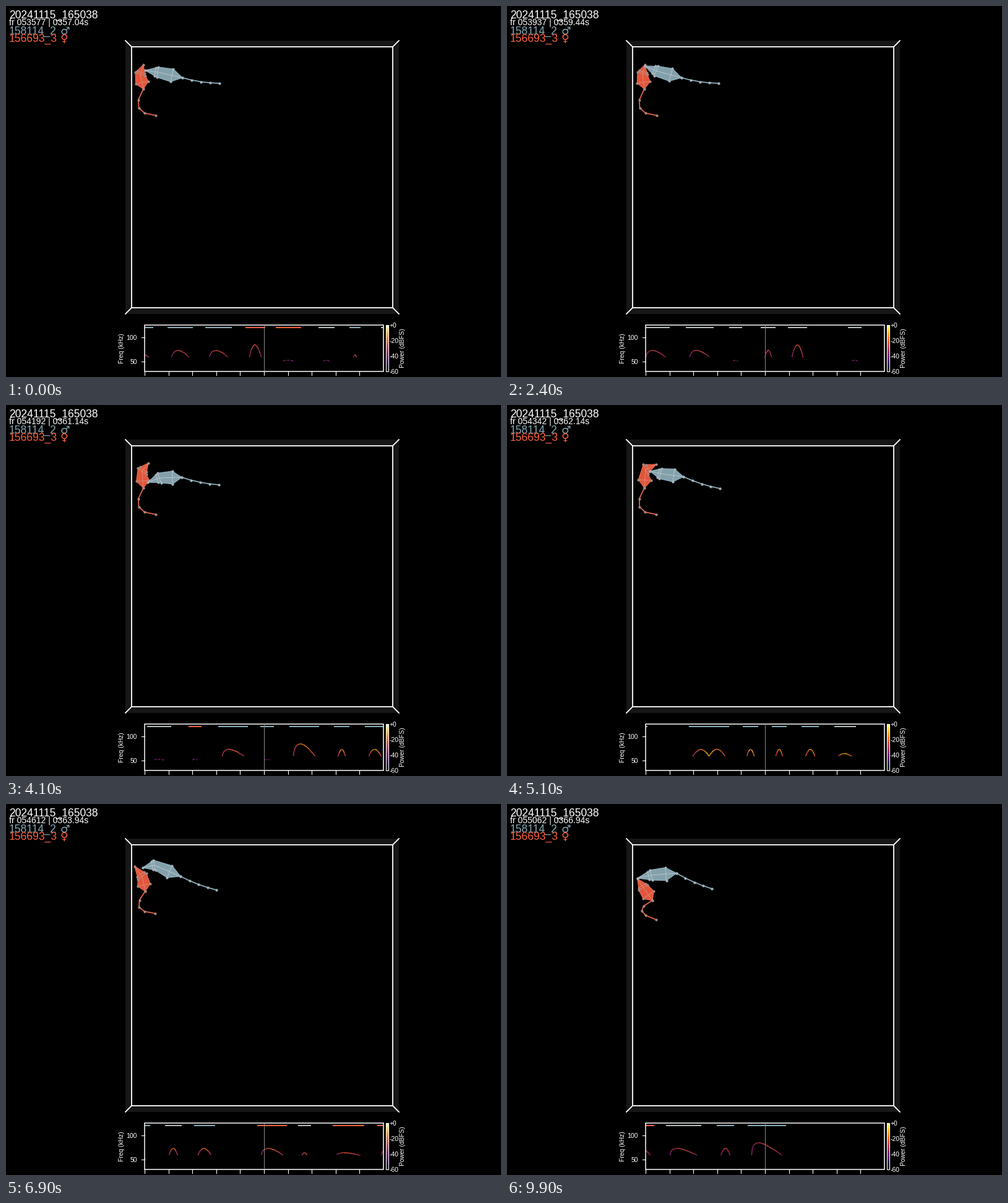
Write a matplotlib script that moves like this. It is 800 by 600 pixels and loops after 10000 ms.

```python
import numpy as np
import matplotlib.pyplot as plt
from matplotlib.animation import FuncAnimation
from matplotlib.collections import LineCollection
from matplotlib.patches import Polygon, Rectangle

FRAMES, STEP = 100, 0.1
PT = 0.72  # points per pixel at 100 dpi
X0, X1, TOP, BOTTOM = 224, 610, 516, 591
SPAN = X1 - X0  # pixels per second of sound
SANS = "Liberation Sans"
COLORS = {"b": "#84adb8", "r": "#f9603f", "g": "#b3bbb9"}
HEIGHTS = {"low": 1, "soft": 4, "hump": 11, "tall": 20}
rng = np.random.default_rng(4)

# Key poses: nose, neck, rump, tail tip
KEYS = np.array([0, 24, 41, 51, 69, 86, 99])
MALE = [
    [225, 104, 245, 107, 285, 116, 345, 125],
    [223, 97, 241, 105, 282, 116, 342, 125],
    [229, 125, 248, 118, 284, 117, 344, 129],
    [231, 107, 248, 111, 285, 116, 344, 135],
    [221, 103, 240, 99, 282, 117, 340, 139],
    [238, 106, 254, 109, 287, 116, 342, 144],
    [211, 120, 233, 115, 274, 112, 331, 137],
]
FEMALE = [
    [222, 95, 217, 110, 222, 134, 242, 177],
    [223, 95, 219, 109, 222, 134, 242, 177],
    [230, 94, 220, 107, 222, 134, 242, 177],
    [241, 96, 224, 104, 222, 134, 241, 177],
    [208, 101, 220, 117, 225, 141, 241, 177],
    [207, 143, 217, 136, 231, 142, 241, 177],
    [211, 121, 220, 135, 235, 156, 241, 187],
]

# Calls: onset and length in ms, caller, kind
CALLS = [
    (-549, 85, "b", "soft"), (-404, 106, "b", "hump"), (-246, 111, "b", "hump"),
    (-78, 83, "r", "tall"), (49, 106, "r", "low"), (228, 67, "g", "low"),
    (357, 47, "b", "soft"), (489, 90, "g", "hump"),
    (1884, 117, "g", "hump"), (2068, 117, "g", "hump"), (2250, 54, "g", "low"),
    (2382, 62, "g", "hump"), (2496, 80, "g", "tall"), (2747, 57, "g", "low"),
    (3610, 101, "g", "low"), (3784, 54, "r", "low"), (3908, 124, "b", "hump"),
    (4084, 57, "b", "low"), (4206, 124, "b", "tall"), (4393, 65, "b", "hump"),
    (4522, 85, "b", "hump"), (4781, 168, "b", "hump"), (5007, 65, "b", "hump"),
    (5128, 62, "b", "hump"), (5253, 73, "b", "hump"), (5390, 91, "g", "soft"),
    (6369, 54, "b", "low"), (6485, 70, "g", "hump"), (6607, 88, "b", "hump"),
    (6872, 124, "r", "hump"), (7042, 54, "g", "soft"), (7188, 132, "r", "soft"),
    (7374, 104, "r", "hump"), (8028, 75, "g", "hump"), (8605, 73, "b", "low"),
    (9027, 85, "r", "low"), (9338, 98, "r", "hump"), (9485, 148, "g", "hump"),
    (9698, 73, "b", "hump"), (9827, 161, "b", "tall"),
]
# Regular bouts of calling between them
for first, last in [(660, 1850), (2930, 3550), (5600, 6300), (7560, 7900)]:
    for ms in range(first, last, 180):
        CALLS.append((ms, rng.integers(65, 115), rng.choice(["b", "g"]), "hump"))


def unit(v):
    return v / np.hypot(*v)


def across(center, direction, half):
    """Two points on either side of a body axis."""
    side = half * unit(np.array([-direction[1], direction[0]]))
    return center + side, center - side


def blend(poses, n):
    """Eased pose between the two nearest keys, as (x, y) rows."""
    i = min(np.searchsorted(KEYS, n, side="right") - 1, len(KEYS) - 2)
    u = (n - KEYS[i]) / (KEYS[i + 1] - KEYS[i])
    u = u * u * (3 - 2 * u)
    a, b = np.array(poses[i], float), np.array(poses[i + 1], float)
    return (a + (b - a) * u).reshape(-1, 2)


fig = plt.figure(figsize=(8, 6), dpi=100, facecolor="black")
spec = fig.add_axes([X0 / 800, 1 - BOTTOM / 600, SPAN / 800, (BOTTOM - TOP) / 600])
spec.set_ylim(BOTTOM, TOP)
spec.axis("off")
ax = fig.add_axes([0, 0, 1, 1], zorder=2)
ax.axis("off")


def line(xs, ys, color="white", w=1.5, **kw):
    return ax.plot(xs, ys, color=color, lw=w * PT, **kw)[0]


def box(x, y, w, h, lw=0.0, fc="none"):
    ax.add_patch(Rectangle((x, y), w, h, fc=fc, ec="white" if lw else "none", lw=lw * PT))


def text(x, y, s, size, color="white", family=SANS, **kw):
    kw.setdefault("va", "baseline")
    return ax.text(x, y, s, fontsize=size * PT, color=color, family=family, **kw)


class Mouse:
    """A kite-shaped body on a nose-neck-rump spine, with a curved tail."""

    def __init__(self, poses, fill, edge, inner, node, z, bend=None):
        self.poses, self.bend = poses, bend
        self.shape = Polygon(np.zeros((8, 2)), fc=fill, ec=edge, lw=1.2 * PT, zorder=z)
        ax.add_patch(self.shape)
        self.bones = LineCollection([], colors=inner, linewidths=PT, zorder=z + 0.1)
        ax.add_collection(self.bones)
        self.rope = line([], [], edge, 1.7, zorder=z + 0.2)
        self.dots = line([], [], node, 1, ls="", marker="o", ms=4.2 * PT,
                         mew=0, zorder=z + 0.3)

    def pose(self, n):
        nose, neck, rump, tip = blend(self.poses, n)
        head, mid = neck + 0.2 * (nose - neck), neck + 0.58 * (rump - neck)
        ear1, ear2 = across(head, nose - neck, 6.5)
        sh1, sh2 = across(neck, nose - neck, 8.3)
        fl1, fl2 = across(mid, neck - rump, 10.4)
        body = np.array([nose, ear1, sh1, fl1, rump, fl2, sh2, ear2])
        bend = (rump + tip) / 2 + [0, 4] if self.bend is None else self.bend
        t = np.linspace(0, 1, 5)[:, None]
        tail = (1 - t) ** 2 * rump + 2 * t * (1 - t) * np.array(bend) + t * t * tip
        self.shape.set_xy(body)
        self.bones.set_segments([[nose, head, neck, mid, rump], [ear1, head, ear2],
                                 [sh1, neck, sh2], [fl1, mid, fl2]])
        self.rope.set_data(*tail.T)
        self.dots.set_data(*np.vstack([body, tail]).T)


def trace(ms, length, kind):
    """Pitch contour of a call and its loudness, one point per pixel."""
    low = kind == "low"
    inset = 0.3 * length if low else 17
    a, b = (ms + inset) * SPAN / 1000, (ms + length - inset) * SPAN / 1000
    x = np.arange(a, b + 0.5)
    u = np.linspace(0, 1, len(x))
    humps = 2 if kind == "hump" and length > 150 else 1
    skew = 1 if humps > 1 else min(1, 75 / length)
    lift = np.abs(np.sin(np.pi * humps * u ** skew)) ** 0.9
    y = (574 if low else 568) - HEIGHTS[kind] * lift + rng.normal(0, 0.25, len(x))
    peak = 0.58 + 0.24 * np.exp(-((ms / 1000 - 5.2) / 1.5) ** 2)
    power = 0.36 if low else peak * (0.65 + 0.35 * np.sin(np.pi * u))
    return np.column_stack([x, y]), power * rng.uniform(0.85, 1.12, len(x))


segs, heat = [], []
for ms, length, who, kind in CALLS:
    path, power = trace(ms, length, kind)
    for i in range(len(path) - 1):
        if kind != "low" or i % 6 < 4:
            segs.append(path[i:i + 2])
            heat.append(power[i])
bars = [[(ms * SPAN / 1000, 520), ((ms + length) * SPAN / 1000, 520)]
        for ms, length, *_ in CALLS]
spec.add_collection(LineCollection(segs, colors=plt.cm.inferno(heat),
                                   linewidths=1.5 * PT), autolim=False)
spec.add_collection(LineCollection(bars, colors=[COLORS[c[2]] for c in CALLS],
                                   linewidths=2 * PT), autolim=False)

# Arena
box(193, 56, 442, 442, fc="#171717")
box(203, 66, 422, 422, 1.8, "black")
for sx in (-1, 1):
    for sy in (-1, 1):
        line((414 + 221 * sx, 414 + 211 * sx), (277 + 221 * sy, 277 + 211 * sy), w=1.8)

# Spectrogram frame, axis and colour bar
line((417, 417), (TOP, BOTTOM), "#8a8a8a", 1)
box(X0, TOP, SPAN, BOTTOM - TOP, 1.5)
for x in np.linspace(X0, X1, 11)[:-1]:
    line((x, x), (BOTTOM, BOTTOM + 6), w=1.1)
for khz in (50, 100):
    y = BOTTOM - (khz - 30) * (BOTTOM - TOP) / 95
    line((X0 - 5, X0), (y, y), w=1.1)
    text(212, y, str(khz), 10.4, ha="right", va="center_baseline")
text(187.5, 553.5, "Freq (kHz)", 10.3, rotation=90, ha="center", va="center")
ax.imshow(np.linspace(1, 0, 128)[:, None], cmap="inferno", aspect="auto",
          extent=(614.4, 618.4, BOTTOM, TOP), zorder=1)
box(614.4, TOP, 4, BOTTOM - TOP, 1.1)
for i, s in enumerate(["+0", "-20", "-40", "-60"]):
    text(619.5, 516.5 + 24.8 * i, s, 10.4, va="center_baseline")
text(641.5, 553.5, "Power (dBFS)", 10.1, rotation=90, ha="center", va="center")

# Header
text(5, 19.5, "20241115_165038", 17.55)
clock = text(5, 31.5, "", 14)
for y, name, sign, c in [(45.5, "158114_2", "\u2642", "#84a5b1"),
                         (57.7, "156693_3", "\u2640", COLORS["r"])]:
    text(5, y, name, 17.55, c)
    text(87.3, y, sign, 17.35, c, "DejaVu Sans")

mice = [Mouse(FEMALE, "#e2553a", "#f0684c", "#dd8673", "#a8867c", 3, bend=(197, 174)),
        Mouse(MALE, "#84a0ab", "#8fb3c0", "#b4c5cb", "#a5b5bd", 4)]
ax.set_xlim(0, 800)
ax.set_ylim(600, 0)


def draw(n):
    left = (n * STEP - 0.5) * SPAN
    spec.set_xlim(left, left + SPAN)
    clock.set_text(f"fr {53577 + 15 * n:06d} | {357.04 + STEP * n:07.2f}s")
    for m in mice:
        m.pose(n)
    return []


anim = FuncAnimation(fig, draw, frames=FRAMES, interval=100, repeat=True,
                     repeat_delay=0, blit=False)
plt.show()
```
